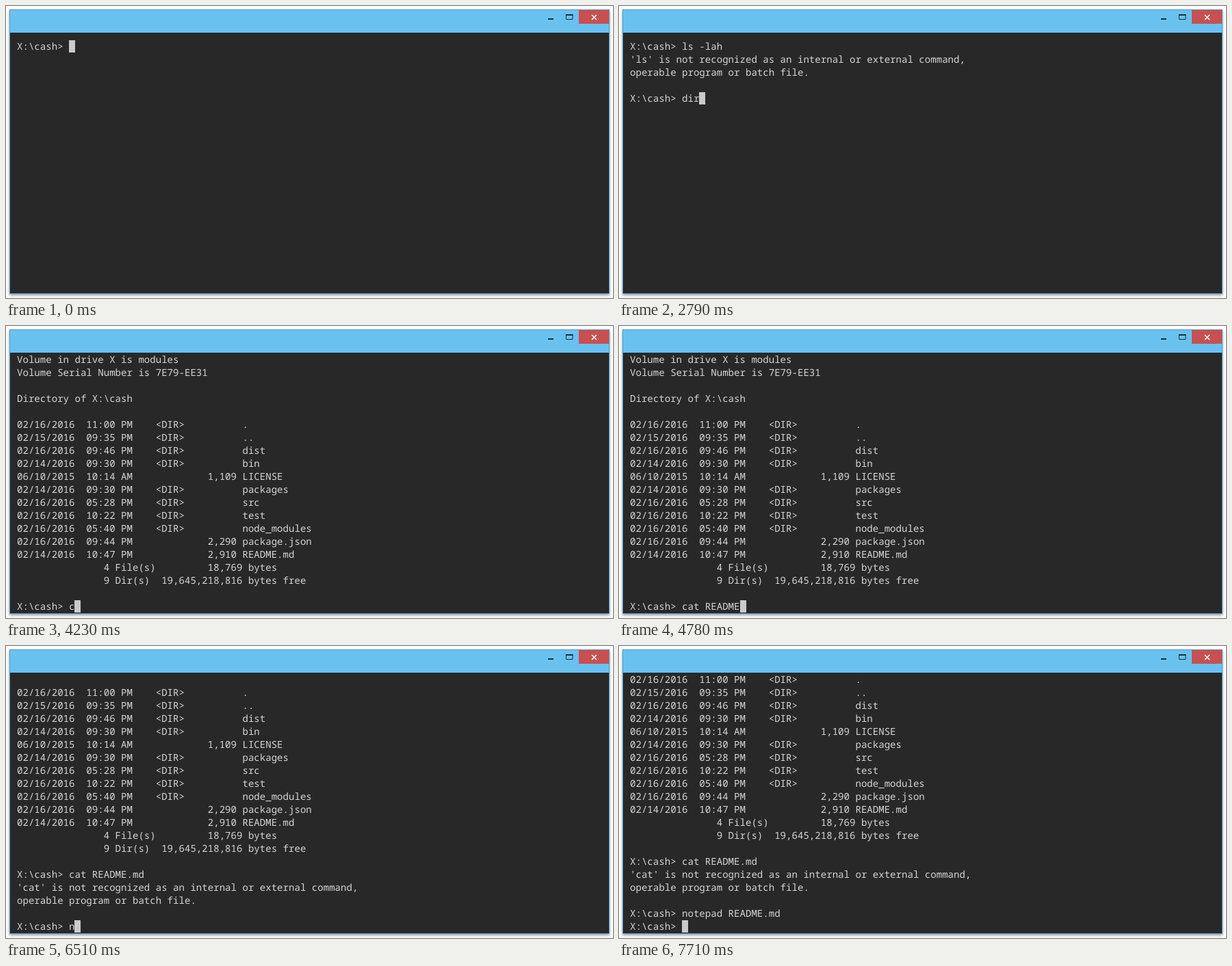
These frames come from a looping animation (887x427 px, 8 s). An HTML page:

```html
<!DOCTYPE html>
<html lang="en">
<head>
<meta charset="utf-8">
<title>Terminal</title>
<style>
  html, body { margin: 0; width: 100%; height: 100%; overflow: hidden; background: #fff; }
  .window {
    position: absolute; left: 5px; top: 5px; width: 877px; height: 416px;
    box-sizing: border-box; background: #282828; border: 1px solid #4a9bc8;
    box-shadow: 0 2px 4px rgba(0, 0, 0, .42);
  }
  .bar { height: 33px; background: #69c1f0; }
  svg { position: absolute; left: 0; top: 0; }
  text {
    font: 14.08px "Noto Sans Mono", "DejaVu Sans Mono", monospace;
    fill: #d6d6d6; white-space: pre; text-rendering: geometricPrecision;
  }
</style>
</head>
<body>
<div class="window"><div class="bar"></div></div>
<svg width="887" height="427" viewBox="0 0 887 427">
  <path d="M792 18h8v2h-8z" fill="#17303d"/>
  <path d="M818.5 13v6.5h9.5V13" fill="none" stroke="#17303d"/>
  <path d="M818 12h10.5v2H818z" fill="#17303d"/>
  <path d="M837 6h44v20h-44z" fill="#c75050"/>
  <path d="M856 13l7 7m0-7l-7 7" fill="none" stroke="#fff" stroke-width="1.6"/>
  <rect id="cursor" width="9" height="18" fill="#cacaca"/>
  <g id="rows"></g>
</svg>
<script>
const LOOP = 8000, ROWS = 20, PITCH = 19, LEFT = 16, CHAR = 8.448;
const PROMPT = 'X:\\cash> ';

const entry = (date, time, name, size) =>
  `${date}  ${time}` + (size ? size.padStart(18) + ' ' : '    <DIR>          ') + name;

const unknown = cmd => [
  `'${cmd}' is not recognized as an internal or external command,`,
  'operable program or batch file.',
  ''
];

const listing = [
  'Volume in drive X is modules',
  'Volume Serial Number is 7E79-EE31',
  '',
  'Directory of X:\\cash',
  '',
  entry('02/16/2016', '11:00 PM', '.'),
  entry('02/15/2016', '09:35 PM', '..'),
  entry('02/16/2016', '09:46 PM', 'dist'),
  entry('02/14/2016', '09:30 PM', 'bin'),
  entry('06/10/2015', '10:14 AM', 'LICENSE', '1,109'),
  entry('02/14/2016', '09:30 PM', 'packages'),
  entry('02/16/2016', '05:28 PM', 'src'),
  entry('02/16/2016', '10:22 PM', 'test'),
  entry('02/16/2016', '05:40 PM', 'node_modules'),
  entry('02/16/2016', '09:44 PM', 'package.json', '2,290'),
  entry('02/14/2016', '10:47 PM', 'README.md', '2,910'),
  ' '.repeat(15) + '4 File(s)         18,769 bytes',
  ' '.repeat(15) + '9 Dir(s)  19,645,218,816 bytes free',
  ''
];

// keys: [time, characters typed so far]; done: when the output appears
const session = [
  { cmd: 'ls -lah', keys: [[780, 2], [930, 5], [1050, 7]], done: 1360, out: unknown('ls') },
  { cmd: 'dir', keys: [[2700, 2], [2790, 3]], done: 3130, out: listing },
  {
    cmd: 'cat README.md',
    keys: [[4230, 1], [4300, 2], [4385, 4], [4470, 5], [4560, 7], [4640, 8], [4730, 10], [4810, 11], [4900, 13]],
    done: 5270, out: unknown('cat')
  },
  {
    cmd: 'notepad README.md',
    keys: [[6510, 1], [6610, 3], [6710, 5], [6810, 6], [6910, 8], [7010, 9], [7110, 11], [7230, 13], [7290, 15], [7500, 17]],
    done: 7710, out: []
  }
];

function linesAt(t) {
  const lines = [];
  for (const { cmd, keys, done, out } of session) {
    if (t < done) {
      const typed = keys.reduce((n, [at, count]) => t >= at ? count : n, 0);
      return [...lines, PROMPT + cmd.slice(0, typed)];
    }
    lines.push(PROMPT + cmd, ...out);
  }
  return [...lines, PROMPT];
}

const cursor = document.getElementById('cursor');
const rows = Array.from({ length: ROWS }, () => {
  const row = document.createElementNS('http://www.w3.org/2000/svg', 'text');
  row.setAttribute('x', LEFT);
  return document.getElementById('rows').appendChild(row);
});

let shown = '';
function draw(t) {
  const all = linesAt(t), key = all.join('\n');
  if (key === shown) return;
  shown = key;
  const lines = all.slice(-ROWS);
  const top = all.length > ROWS ? 40 : 50;
  rows.forEach((row, i) => {
    row.setAttribute('y', top + 14 + i * PITCH);
    row.textContent = lines[i] || '';
  });
  const last = lines.length - 1;
  cursor.setAttribute('x', Math.round(LEFT + lines[last].length * CHAR));
  cursor.setAttribute('y', top + last * PITCH);
}

const start = performance.now();
function tick() {
  draw((performance.now() - start) % LOOP);
  requestAnimationFrame(tick);
}
tick();
</script>
</body>
</html>
```
